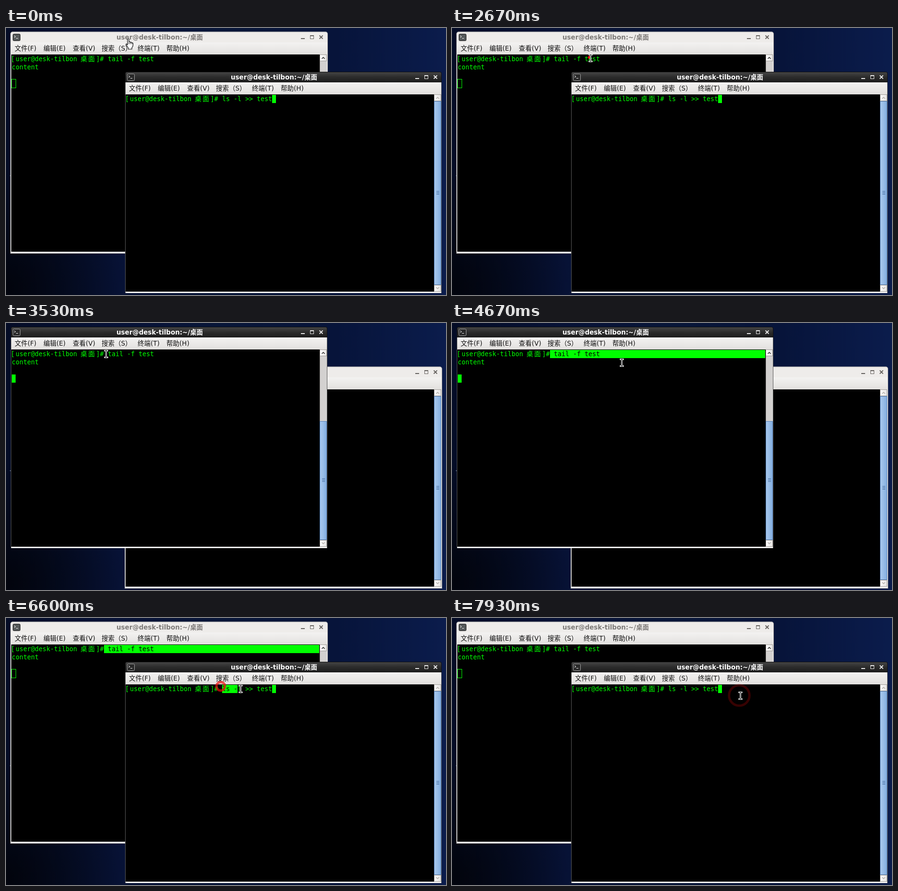
Animation of 916 by 555 pixels, one loop 8000 ms. Source, as an HTML page with a canvas:

```html
<!DOCTYPE html>
<html lang="zh-CN">
<head>
<meta charset="utf-8">
<title>tail -f</title>
<style>
html, body { margin: 0; width: 916px; height: 555px; overflow: hidden; background: #040c28; }
canvas { display: block; }
</style>
</head>
<body>
<canvas id="stage" width="916" height="555"></canvas>
<script>
const ctx = document.getElementById('stage').getContext('2d');
const CJK = '"Noto Sans CJK SC", "Noto Sans CJK", sans-serif';
const TITLE = 'bold 13.4px "DejaVu Sans", ' + CJK;
const MENU = '13.5px "DejaVu Sans", ' + CJK;
const MONO = '13.29px "DejaVu Sans Mono", monospace';
const HAN = '14px ' + CJK;
const GREEN = '#00ff00';
const LOGIN = 'user@desk-tilbon';
const STEP = 200 / 3, STEPS = 120;
const CELL = 8, ROW = 17;
const MENUS = [['文件(F)', 18], ['编辑(E)', 78], ['查看(V)', 139],
  ['搜索（S）', 199], ['终端(T)', 274], ['帮助(H)', 334]];

// pointer path: step, x, y
const PATH = [[0, 257, 32], [4, 257, 32], [8, 246, 50], [12, 224, 79], [14, 209, 72],
  [16, 213, 64], [28, 213, 64], [35, 281, 63], [36, 281, 63], [37, 288, 62], [46, 288, 62],
  [52, 210, 64], [53, 208, 64], [55, 208, 64], [62, 293, 63], [63, 293, 63], [64, 325, 66],
  [65, 353, 71], [69, 353, 71], [70, 353, 82], [75, 776, 197], [82, 776, 197], [94, 450, 143],
  [97, 450, 143], [99, 488, 147], [105, 596, 157], [110, 596, 157], [113, 600, 161], [120, 600, 161]];

// clicks: step, x, y
const CLICKS = [[19, 211, 63], [40, 286, 61], [55, 206, 63], [75, 774, 196],
  [97, 447, 142], [114, 598, 161]];

function rect(x, y, w, h, fill) {
  ctx.fillStyle = fill;
  ctx.fillRect(x, y, w, h);
}

function frame(x, y, w, h, color) {
  ctx.strokeStyle = color;
  ctx.lineWidth = 1;
  ctx.strokeRect(x + 0.5, y + 0.5, w - 1, h - 1);
}

function text(s, x, y, font, color, align = 'left') {
  ctx.font = font;
  ctx.textAlign = align;
  ctx.fillStyle = color;
  ctx.fillText(s, x, y);
}

function line(points, color, width, cap = 'butt') {
  ctx.strokeStyle = color;
  ctx.lineWidth = width;
  ctx.lineCap = cap;
  ctx.beginPath();
  points.forEach(([x, y]) => ctx.lineTo(x, y));
  ctx.stroke();
}

function ramp(x0, y0, x1, y1, ...colors) {
  const g = ctx.createLinearGradient(x0, y0, x1, y1);
  colors.forEach((c, i) => g.addColorStop(i / (colors.length - 1), c));
  return g;
}

function roundTop(x, y, w, h, r, fill) {
  ctx.fillStyle = fill;
  ctx.beginPath();
  ctx.roundRect(x, y, w, h, [r, r, 0, 0]);
  ctx.fill();
}

function wallpaper() {
  rect(0, 0, 916, 555, ramp(0, 0, 916, 0, '#040c26', '#071236', '#081638', '#07143a', '#0b1c4c'));
  const shade = ctx.createRadialGradient(0, 540, 10, 0, 540, 250);
  shade.addColorStop(0, 'rgba(2,4,12,0.95)');
  shade.addColorStop(1, 'rgba(2,4,12,0)');
  rect(0, 250, 300, 305, shade);
  rect(8, 306, 2, 2, '#4a5570');
}

function icon(active) {
  ctx.fillStyle = active ? '#2a2a2a' : '#55595a';
  ctx.beginPath();
  ctx.roundRect(14.5, 12.5, 15, 14, 2);
  ctx.fill();
  ctx.strokeStyle = active ? '#a8a8a8' : '#1a1a1a';
  ctx.lineWidth = 1;
  ctx.stroke();
  line([[17, 16], [20, 18], [17, 20]], '#f0f0f0', 1);
  line([[21, 21.5], [25, 21.5]], '#f0f0f0', 1);
}

function buttons(color) {
  rect(614, 21, 8, 2, color);
  frame(633, 15, 8, 8, color);
  rect(633, 15, 8, 2, color);
  line([[652.5, 15.5], [659.5, 22.5]], color, 1.8);
  line([[659.5, 15.5], [652.5, 22.5]], color, 1.8);
}

function arrowButton(y, dir, color) {
  rect(653, y, 15, 14, ramp(653, 0, 668, 0, '#ffffff', '#e6e4e2'));
  frame(653, y, 15, 14, '#a09c98');
  const m = y + 7;
  line([[657.5, m + 2 * dir], [660.5, m - dir], [663.5, m + 2 * dir]], color, 1.4);
}

function scrollbar(thumb, upColor) {
  rect(653, 55, 15, 410, '#d3d1d0');
  rect(653, 55, 1, 410, '#9a9794');
  const h = 451 - thumb;
  rect(653, thumb, 15, h, ramp(653, 0, 668, 0, '#a9c9ee', '#98bde8', '#7fabdf'));
  frame(653, thumb, 15, h, '#5580b8');
  const mid = Math.floor(thumb + h / 2) - 4;
  for (let i = 0; i < 3; i++) rect(658, mid + i * 3, 6, 1, '#41689c');
  arrowButton(55, 1, upColor);
  arrowButton(451, -1, '#b0aca8');
}

function prompt(command, x, color) {
  if (!color) {
    text('[', 10, 69, MONO, GREEN);
    text(LOGIN, 20, 69, MONO, GREEN);
    text('桌', 155, 69, HAN, GREEN);
    text('面', 171, 69, HAN, GREEN);
    text(']#', 187.5, 69, MONO, GREEN);
  }
  text(command, x, 69, MONO, color || GREEN);
}

function drawWindow(win, active, sel) {
  ctx.save();
  ctx.translate(win.x, win.y);
  if (active) {
    roundTop(10, 8, 659, 460, 4, '#101010');
    roundTop(11, 9, 657, 22, 3, ramp(0, 9, 0, 30, '#444444', '#2b2b2b', '#1c1c1c'));
  } else {
    roundTop(9, 7.5, 661, 461.5, 5, '#a9a7a5');
    roundTop(10, 8.5, 659, 459.5, 4, '#eeecea');
  }
  icon(active);
  text(LOGIN + ':~/桌面', 320, 24, TITLE, active ? '#ffffff' : '#7d7a78', 'center');
  buttons(active ? '#e8e8e8' : '#65625f');

  const edge = active ? '#5a5a5a' : '#f2f1f0';
  rect(10, 30, 659, 438, edge);
  rect(11, 30, 657, 25, ramp(0, 30, 0, 55, '#f3f2f1', '#e2e0de'));
  MENUS.forEach(([s, x]) => text(s, x, 47, MENU, '#111'));
  rect(11, 55, 657, 413, '#f2f1f0');
  rect(11, 55, 642, 410, '#000');
  scrollbar(win.thumb, win.upColor);

  prompt(win.command, win.textX);
  win.output.forEach((s, i) => text(s, 12, 69 + ROW * (i + 1), MONO, GREEN));
  const cy = 56 + ROW * win.cursorRow;
  if (active) rect(win.cursorX, cy, CELL, ROW, GREEN);
  else frame(win.cursorX - 1, cy - 1, CELL + 2, ROW + 2, GREEN);

  if (sel) {
    const [from, to] = sel;
    rect(from, 56, to - from, ROW, GREEN);
    ctx.beginPath();
    ctx.rect(from, 56, to - from, ROW);
    ctx.clip();
    prompt(win.command, win.textX, '#000');
  }
  ctx.restore();
}

const reader = { x: 0, y: 0, thumb: 204, upColor: '#222', command: 'tail -f test', textX: 212,
  output: ['content'], cursorX: 12, cursorRow: 3 };
const writer = { x: 238, y: 83, thumb: 69, upColor: '#b0aca8', command: 'ls -l >> test', textX: 212,
  output: [], cursorX: 316, cursorRow: 0 };

function pointerAt(k) {
  let i = 1;
  while (PATH[i][0] < k) i++;
  const [k0, x0, y0] = PATH[i - 1], [k1, x1, y1] = PATH[i];
  const p = (k - k0) / (k1 - k0);
  return [Math.round(x0 + (x1 - x0) * p), Math.round(y0 + (y1 - y0) * p)];
}

// Dragging past the end of the text selects the rest of the row.
function selection(win, k, start, end, from, off) {
  if (k <= start || k >= off) return null;
  const x = pointerAt(Math.min(k, end))[0] - win.x;
  const textEnd = win.textX + win.command.length * CELL;
  const to = x >= textEnd ? 652 : 12 + Math.floor((x - 12) / CELL) * CELL;
  return to > from ? [from, to] : null;
}

function rings(k) {
  CLICKS.forEach(([start, x, y]) => {
    const age = k - start;
    if (age < 0 || age > 6) return;
    const outer = 3 + 4.15 * age;
    const width = Math.min(5, outer);
    ctx.strokeStyle = `rgba(235,12,12,${1 - age / 6.5})`;
    ctx.lineWidth = width;
    ctx.beginPath();
    ctx.arc(x, y, outer - width / 2, 0, Math.PI * 2);
    ctx.stroke();
  });
}

// Black core with a white outline
function beam(x, y) {
  const top = y - 6.5, bottom = y + 7.5, mid = x + 0.5;
  const strokes = [
    [[x - 2, top], [x + 3, top]],
    [[x - 2, bottom], [x + 3, bottom]],
    [[mid, top], [mid, bottom]]
  ];
  strokes.forEach(s => line(s, '#fff', 3, 'square'));
  strokes.forEach(s => line(s, '#000', 1));
}

function hand(x, y) {
  ctx.save();
  ctx.translate(x - 8, y - 11);
  ctx.beginPath();
  ctx.moveTo(4, 14);
  ctx.lineTo(4, 2);
  ctx.quadraticCurveTo(5.5, -0.5, 7, 2);
  ctx.lineTo(7, 8);
  ctx.quadraticCurveTo(9, 6.5, 10, 9);
  ctx.quadraticCurveTo(12, 7.5, 13, 10);
  ctx.quadraticCurveTo(15.5, 9, 15.5, 12);
  ctx.lineTo(15, 17);
  ctx.lineTo(13, 20);
  ctx.lineTo(13, 23);
  ctx.lineTo(5.5, 23);
  ctx.lineTo(5.5, 20);
  ctx.lineTo(0.7, 13.5);
  ctx.quadraticCurveTo(1, 10.5, 4, 14);
  ctx.closePath();
  ctx.fillStyle = '#fff';
  ctx.fill();
  ctx.strokeStyle = '#000';
  ctx.lineWidth = 1.2;
  ctx.lineJoin = 'round';
  ctx.stroke();
  [7, 10, 13].forEach(fx => line([[fx, 9], [fx, 12.5]], '#000', 1));
  ctx.restore();
}

function draw(k) {
  wallpaper();
  const readerFront = k >= 41 && k < 76;
  const readerSel = selection(reader, k, 55, 65, 204, 108);
  const writerSel = selection(writer, k, 97, 105, 212, 114);
  if (readerFront) {
    drawWindow(writer, false, writerSel);
    drawWindow(reader, true, readerSel);
  } else {
    drawWindow(reader, false, readerSel);
    drawWindow(writer, true, writerSel);
  }
  rings(k);
  const [x, y] = pointerAt(k);
  if (y < 55) hand(x, y);
  else beam(x, y);
}

let last = -1;
function tick() {
  const k = Math.floor((performance.now() + 4) / STEP) % STEPS;
  if (k !== last) draw(last = k);
  requestAnimationFrame(tick);
}
draw(0);
tick();
</script>
</body>
</html>
```
